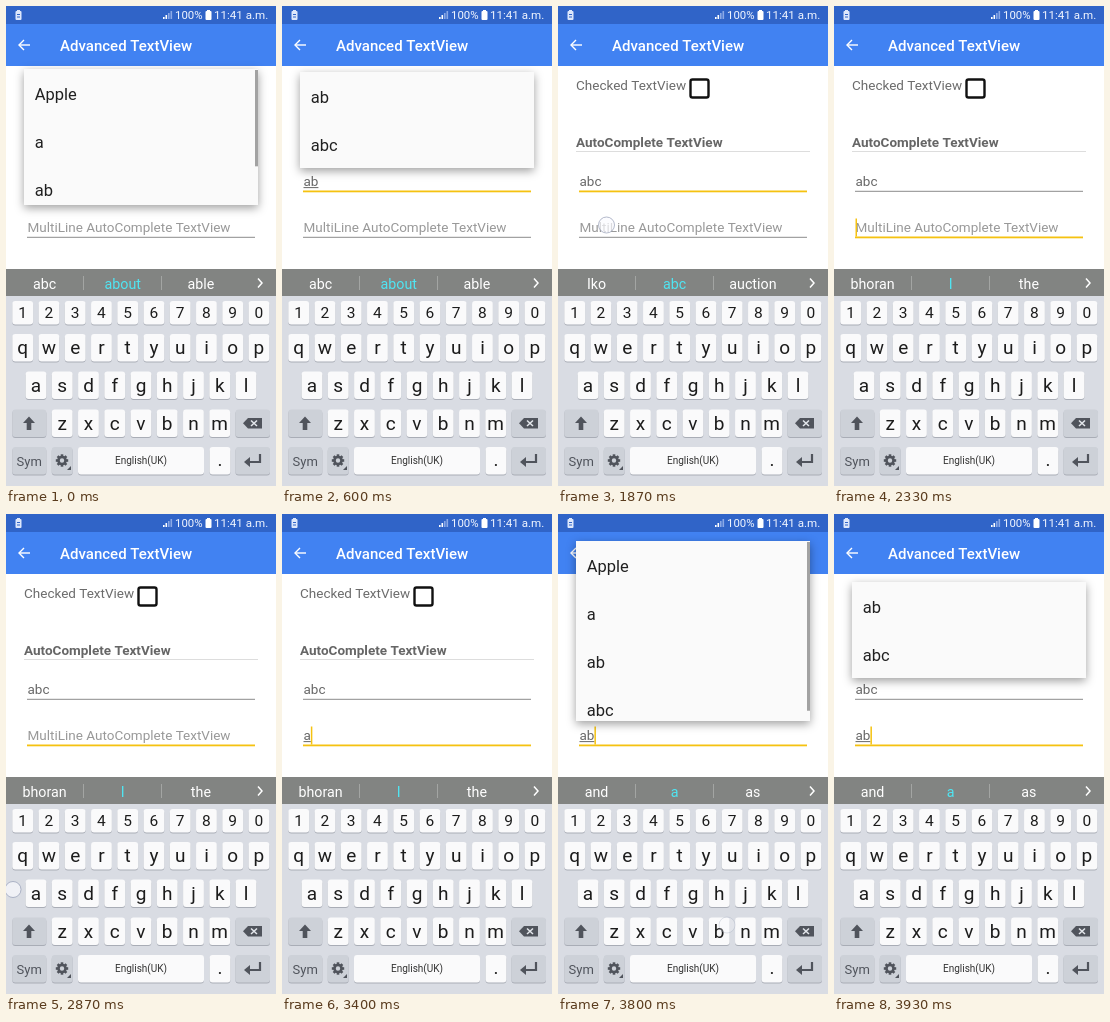
An HTML page with a canvas that plays this animation: 270 by 480 pixels, repeating every 3.99 s.

```html
<!DOCTYPE html>
<html lang="en">
<head>
<meta charset="utf-8">
<title>Advanced TextView</title>
<style>
html, body { margin: 0; width: 100%; height: 100%; overflow: hidden; background: #fff; }
canvas { display: block; width: 270px; height: 480px; }
</style>
</head>
<body>
<canvas id="stage"></canvas>
<script>
const LOOP = 3990;
const canvas = document.getElementById('stage');
const ctx = canvas.getContext('2d');
const ratio = window.devicePixelRatio || 1;
canvas.width = 270 * ratio;
canvas.height = 480 * ratio;

const clamp = v => Math.max(0, Math.min(1, v));
const ramp = (t, from, to) => clamp((t - from) / (to - from));
const within = (t, from, to) => t >= from && t < to;

function rect(x, y, w, h, color) {
  ctx.fillStyle = color;
  ctx.fillRect(x, y, w, h);
}

function round(x, y, w, h, r, color) {
  ctx.beginPath();
  ctx.roundRect(x, y, w, h, r);
  ctx.fillStyle = color;
  ctx.fill();
}

function text(str, x, y, size, color, align = 'left', weight = 400) {
  ctx.font = `${weight} ${size}px Roboto, sans-serif`;
  ctx.textAlign = align;
  ctx.fillStyle = color;
  ctx.fillText(str, x, y);
}

function line(points, color, width = 1) {
  ctx.beginPath();
  points.forEach(([x, y]) => ctx.lineTo(x, y));
  ctx.strokeStyle = color;
  ctx.lineWidth = width;
  ctx.stroke();
}

function shape(points, color) {
  ctx.beginPath();
  points.forEach(([x, y]) => ctx.lineTo(x, y));
  ctx.fillStyle = color;
  ctx.fill();
}

function header() {
  rect(0, 0, 270, 18, '#3064c8');
  rect(0, 18, 270, 42, '#4182f2');
  const pale = '#dde7fb';
  round(9.5, 5, 6, 9, 1, pale);
  rect(11, 4, 3, 1, pale);
  line([[11, 8.5], [14, 8.5]], '#3064c8');
  line([[11, 11], [14, 11]], '#3064c8');
  for (let i = 0; i < 4; i++) rect(157 + i * 2.5, 11 - i * 2, 1.6, 2 + i * 2, i < 2 ? '#fff' : '#8ba9e6');
  text('100%', 169, 13, 11.4, '#f2f6ff');
  round(199.5, 5, 6, 9, 1, '#fff');
  rect(201, 4, 3, 1, '#fff');
  text('11:41 a.m.', 208, 13, 11.6, '#f2f6ff');
  line([[18, 34], [13, 39], [18, 44]], '#fff', 1.4);
  line([[13, 39], [24, 39]], '#fff', 1.4);
  text('Advanced TextView', 54, 45, 15, '#fff', 'left', 500);
}

function field(y, value, { hint = '', focused, composing, cursor }) {
  text(value || hint, 21.5, y, 13.5, value ? '#686868' : '#999');
  const end = value ? 21.5 + ctx.measureText(value).width : 21.5;
  if (composing && value) rect(21.5, y + 1.6, end - 21.5, 1, '#686868');
  if (focused) rect(21, y + 5, 228, 1.8, '#f5c211');
  else rect(21, y + 5.3, 228, 1, '#8c8c8c');
  if (cursor) rect(end, y - 13, 1.5, 18, '#f5c211');
}

function page(t) {
  text('Checked TextView', 18, 84, 13.5, '#6c6c6c');
  ctx.beginPath();
  ctx.roundRect(132.5, 73.5, 18, 18, 2);
  ctx.strokeStyle = '#111';
  ctx.lineWidth = 2.4;
  ctx.stroke();
  text('AutoComplete TextView', 18, 140.5, 13.5, '#666', 'left', 700);
  rect(18, 145, 234, 1, '#ddd');

  const second = t >= 2070;
  field(179.5, t < 1330 ? 'ab' : 'abc', {
    focused: !second,
    composing: t < 1330,
    cursor: t < 600 || within(t, 1100, 1830)
  });
  field(225.5, t < 3130 ? '' : t < 3730 ? 'a' : 'ab', {
    hint: 'MultiLine AutoComplete TextView',
    focused: second,
    composing: true,
    cursor: within(t, 2070, 2600) || t >= 3100
  });
}

function suggestions(t) {
  const words = t < 1470 ? ['abc', 'about', 'able']
    : t < 2130 ? ['Iko', 'abc', 'auction']
    : t < 3470 ? ['bhoran', 'I', 'the']
    : ['and', 'a', 'as'];
  rect(0, 263, 270, 28, '#828482');
  words.forEach((word, i) =>
    text(word, 38.5 + i * 78.2, 282.5, 14.25, i === 1 ? '#4fe5f2' : '#fff', 'center'));
  rect(77, 270, 1, 14, '#a3a5a3');
  rect(155, 270, 1, 14, '#a3a5a3');
  line([[252, 272.5], [256, 277], [252, 281.5]], '#fff', 1.5);
}

function key(x, y, w, h, color = '#fafafb') {
  round(x, y + 1, w, h, 3, '#a9adb6');
  round(x, y, w, h, 3, color);
}

function keyRow(chars, firstX, y, h, size, pressed) {
  [...chars].forEach((char, i) => {
    const x = firstX + i * 26.25;
    key(x - 10.4, y, 20.8, h, char === pressed ? '#dfe3ea' : undefined);
    text(char, x, y + h / 2 + size * 0.34, size, '#1c1c1c', 'center');
  });
}

function gear(x, y) {
  ctx.save();
  ctx.translate(x, y);
  for (let i = 0; i < 8; i++) {
    rect(-1.3, -6.2, 2.6, 3, '#50545c');
    ctx.rotate(Math.PI / 4);
  }
  ctx.beginPath();
  ctx.arc(0, 0, 3.5, 0, Math.PI * 2);
  ctx.strokeStyle = '#50545c';
  ctx.lineWidth = 2.6;
  ctx.stroke();
  ctx.restore();
}

function keyboard(t) {
  const grey = '#cdd1d8', ink = '#50545c';
  const pressed = within(t, 3000, 3130) ? 'a' : within(t, 3600, 3730) ? 'b' : '';
  rect(0, 290, 270, 190, '#d9dce3');
  keyRow('1234567890', 16.7, 295, 23.5, 15.5, pressed);
  keyRow('qwertyuiop', 16.7, 328, 27.5, 19, pressed);
  keyRow('asdfghjkl', 30, 365.5, 27.5, 19, pressed);
  keyRow('zxcvbnm', 56.2, 403.5, 27.5, 19, pressed);

  key(6.3, 403.5, 34, 27.5, grey);
  shape([[23, 410.5], [29, 417], [25.3, 417], [25.3, 424], [20.7, 424], [20.7, 417], [17, 417]], ink);
  key(229.5, 403.5, 34.5, 27.5, grey);
  shape([[237, 417.3], [242, 412], [256, 412], [256, 422.6], [242, 422.6]], ink);
  line([[245, 414.5], [251, 420]], '#e4e7ec', 1.5);
  line([[251, 414.5], [245, 420]], '#e4e7ec', 1.5);

  key(6.3, 441, 34, 27.5, grey);
  text('Sym', 23.2, 459.5, 13, ink, 'center');
  key(45.8, 441, 20.8, 27.5, grey);
  gear(56, 454.5);
  shape([[61, 464], [65, 464], [65, 460]], ink);
  key(72, 441, 126, 27.5);
  text('English(UK)', 135, 458, 10, '#333', 'center');
  key(203.6, 441, 20.8, 27.5);
  text('.', 214, 460, 19, '#1c1c1c', 'center');
  key(229.5, 441, 34.5, 27.5, grey);
  line([[254, 448], [254, 456], [241, 456]], ink, 2.2);
  shape([[238, 456], [244, 451], [244, 461]], ink);
}

function popup({ top, height, items, alpha = 1, highlight = 0 }) {
  if (alpha <= 0) return;
  ctx.save();
  ctx.globalAlpha = alpha;
  ctx.shadowColor = 'rgba(0,0,0,.38)';
  ctx.shadowBlur = 9 * ratio;
  ctx.shadowOffsetY = 3 * ratio;
  rect(18, top, 234, height, '#fafafa');
  ctx.shadowColor = 'transparent';
  ctx.beginPath();
  ctx.rect(18, top, 234, height);
  ctx.clip();
  if (highlight) rect(18, top + 48, 234, 48, `rgba(0,0,0,${0.055 * highlight})`);
  items.forEach((item, i) => text(item, 28.8, top + 30.5 + i * 48, 16.5, '#202020'));
  const total = items.length * 48;
  if (total > height) rect(249, top + 1, 3, height * height / total, '#a2a2a2');
  ctx.restore();
}

function popups(t) {
  const all = ['Apple', 'a', 'ab', 'abc'];
  const matches = ['ab', 'abc'];
  if (t < 70) popup({ top: 63, height: 136, items: all });
  else if (t < 1400) popup({
    top: 66, height: 96, items: matches,
    alpha: 1 - ramp(t, 1270, 1400),
    highlight: ramp(t, 930, 1130)
  });
  else if (within(t, 3470, 3870)) popup({
    top: 27, height: 180, items: all, alpha: ramp(t, 3440, 3600)
  });
  else if (t >= 3870) popup({
    top: 46 + 22 * ramp(t, 3870, 3930), height: 96, items: matches
  });
}

function touch(x, y, alpha) {
  if (alpha <= 0) return;
  ctx.save();
  ctx.globalAlpha = alpha;
  ctx.beginPath();
  ctx.arc(x, y, 8, 0, Math.PI * 2);
  ctx.fillStyle = 'rgba(250,251,255,.68)';
  ctx.fill();
  ctx.strokeStyle = 'rgba(140,150,175,.65)';
  ctx.lineWidth = 1;
  ctx.stroke();
  ctx.restore();
}

function draw() {
  const t = performance.now() % LOOP;
  ctx.setTransform(ratio, 0, 0, ratio, 0, 0);
  rect(0, 0, 270, 480, '#fff');
  header();
  page(t);
  suggestions(t);
  keyboard(t);
  popups(t);
  if (within(t, 1800, 2200)) touch(48.5, 219, 1 - ramp(t, 2070, 2200));
  if (within(t, 2870, 3130)) touch(7, 375.5, 1 - ramp(t, 3000, 3130));
  if (within(t, 3600, 3870)) touch(169, 411, 1 - 0.6 * ramp(t, 3730, 3800));
  requestAnimationFrame(draw);
}
draw();
</script>
</body>
</html>
```
